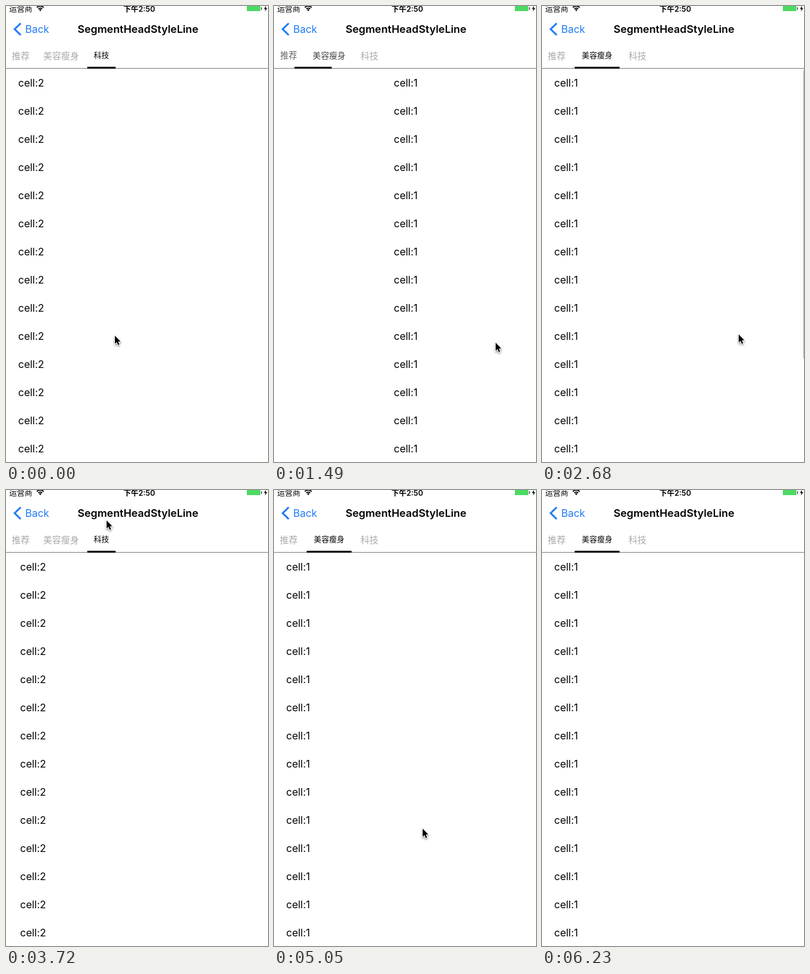
Recreate the animation shown at these times as an HTML page with a canvas. Size 409x713 px, loop 6.97 s.

```html
<!DOCTYPE html>
<html>
<head>
<meta charset="utf-8">
<style>
html, body { margin: 0; width: 100%; height: 100%; overflow: hidden; background: #fff; }
canvas { display: block; width: 409px; height: 713px; }
</style>
</head>
<body>
<canvas id="stage"></canvas>
<script>
// The screen refreshes in steps; all motion below is timed in steps.
const W = 409, H = 713, LOOP = 6970, STEP = 148.4;
const LATIN = 'Inter, "Noto Sans CJK SC", sans-serif';
const HAN = '"Noto Sans CJK SC", "Noto Sans CJK", sans-serif';
const BLUE = '#1f7bf6';

const canvas = document.getElementById('stage');
const ratio = window.devicePixelRatio || 1;
canvas.width = W * ratio;
canvas.height = H * ratio;
const ctx = canvas.getContext('2d');

const TABS = [
  { label: '推荐', mid: 23, x: 3, w: 41 },
  { label: '美容瘦身', mid: 86, x: 51, w: 70 },
  { label: '科技', mid: 149, x: 127, w: 44 }
];

// Each page change: first step, duration, page it ends on.
const SWIPES = [
  { at: 4, lasts: 4, to: 1 },
  { at: 8, lasts: 4.54, to: 0 },
  { at: 14, lasts: 4, to: 1 },
  { at: 23, lasts: 2.105, to: 2 },
  { at: 27, lasts: 4, to: 1 }
];

// Turning points of the pointer: [step, x, y].
const STROKES = [
  [[0, 169, 514], [3, 84, 419], [4, 84, 419], [6, 300, 472], [8, 178, 490],
    [10, 345, 525], [14, 298, 509], [16, 140, 508], [18, 306, 512],
    [23, 148, 72], [25, 156, 46], [27, 110, 500], [30, 361, 700]],
  [[34, 231, 528], [38, 243, 700]]
];

// Scroll bar appearances: [first step, last step].
const BAR_SPANS = [[13, 14], [17, 19], [35, 41]];

const lerp = (a, b, k) => a + (b - a) * k;
const clamp = k => Math.max(0, Math.min(1, k));
const ease = k => k * k * (3 - 2 * k);

const pageAt = s => SWIPES.reduce(
  (page, m) => lerp(page, m.to, ease(clamp((s - m.at) / m.lasts))), 2);

const pullAt = s => 84 * Math.sin(Math.PI * clamp((s - 34) / 7));

function pointerAt(s) {
  const path = STROKES.find(p => s >= p[0][0] && s <= p[p.length - 1][0]);
  if (!path) return null;
  const n = Math.max(1, path.findIndex(p => p[0] >= s));
  const [s0, x0, y0] = path[n - 1], [s1, x1, y1] = path[n];
  const k = ease((s - s0) / (s1 - s0));
  return [Math.round(lerp(x0, x1, k)), Math.round(lerp(y0, y1, k))];
}

function text(str, x, y, font, color, align = 'left') {
  ctx.font = font;
  ctx.fillStyle = color;
  ctx.textAlign = align;
  ctx.fillText(str, x, y);
}

function rect(x, y, w, h, color) {
  ctx.fillStyle = color;
  ctx.fillRect(x, y, w, h);
}

function poly(points, color) {
  ctx.beginPath();
  points.forEach(([x, y]) => ctx.lineTo(x, y));
  ctx.closePath();
  ctx.fillStyle = color;
  ctx.fill();
}

function drawWifi() {
  ctx.strokeStyle = '#000';
  ctx.lineWidth = 1.7;
  for (const r of [4.2, 7.4]) {
    ctx.beginPath();
    ctx.arc(53.5, 7.5, r, -Math.PI * 0.76, -Math.PI * 0.24);
    ctx.stroke();
  }
  poly([[51.5, 5.8], [53.5, 5], [55.5, 5.8], [53.5, 8.3]], '#000');
}

function drawHeader() {
  text('运营商', 5, 9, '12px ' + HAN, '#000');
  drawWifi();
  text('下午2:50', 208, 8.5, '600 11.8px ' + LATIN, '#000', 'center');
  rect(376, 0, 21, 8, '#4cd964');
  rect(398, 2, 1.5, 4, '#555');
  poly([[406, 0], [402.5, 4.6], [405, 4.6], [404, 8.5], [408, 3.4], [405.5, 3.4]], '#000');

  ctx.strokeStyle = BLUE;
  ctx.lineWidth = 2.8;
  ctx.beginPath();
  ctx.moveTo(23, 27);
  ctx.lineTo(13.5, 36.2);
  ctx.lineTo(23, 45.5);
  ctx.stroke();
  text('Back', 30, 42, '16px ' + LATIN, BLUE);
  text('SegmentHeadStyleLine', 206, 42, '600 16.6px ' + LATIN, '#000', 'center');
}

function drawTabs(page) {
  TABS.forEach((tab, i) => {
    const far = clamp(Math.abs(page - i));
    const size = lerp(12, 14, far), g = Math.round(170 * far);
    text(tab.label, tab.mid, 77.5 + size * 0.37, `${size}px ${HAN}`,
      `rgb(${g},${g},${g})`, 'center');
  });
  const n = Math.min(1, Math.floor(page)), a = TABS[n], b = TABS[n + 1];
  rect(0, 97, W, 1, '#808080');
  rect(Math.ceil(lerp(a.x, b.x, page - n)), 95,
    Math.round(lerp(a.w, b.w, page - n)), 3, '#000');
}

function drawCells(page, pull) {
  ctx.save();
  ctx.beginPath();
  ctx.rect(0, 98, W, H - 98);
  ctx.clip();
  TABS.forEach((tab, i) => {
    const x = 19 + Math.round((i - page) * W);
    for (let y = 126; y < H + 20; y += 44) {
      text('cell:' + i, x, y + pull, '16px ' + LATIN, '#000');
    }
  });
  ctx.restore();
}

function drawBar(s, pull) {
  const span = BAR_SPANS.find(([a, b]) => s >= a && s <= b);
  if (span) rect(408, 101, 1, 450 - pull, s === span[1] ? '#ccc' : '#aaa');
}

function drawPointer([x, y]) {
  const shape = [[1, 1.5], [1, 14.2], [3.9, 11.6], [6, 16.2], [8, 15.3], [6, 10.8], [9.8, 10.5]];
  ctx.save();
  ctx.translate(x, y);
  ctx.shadowColor = 'rgba(0,0,0,0.4)';
  ctx.shadowBlur = 3 * ratio;
  ctx.shadowOffsetY = 1.5 * ratio;
  ctx.strokeStyle = '#fff';
  ctx.lineWidth = 1.8;
  poly(shape, '#fff');
  ctx.stroke();
  ctx.shadowColor = 'transparent';
  ctx.stroke();
  poly(shape, '#000');
  ctx.restore();
}

function draw(time) {
  const s = Math.floor((time % LOOP + 5) / STEP);
  const page = pageAt(s), pull = pullAt(s), pointer = pointerAt(s);
  ctx.setTransform(ratio, 0, 0, ratio, 0, 0);
  rect(0, 0, W, H, '#fff');
  drawHeader();
  drawCells(page, pull);
  drawTabs(page);
  drawBar(s, pull);
  if (pointer) drawPointer(pointer);
}

const start = performance.now();
function tick() {
  draw(performance.now() - start);
  requestAnimationFrame(tick);
}
tick();
</script>
</body>
</html>
```
